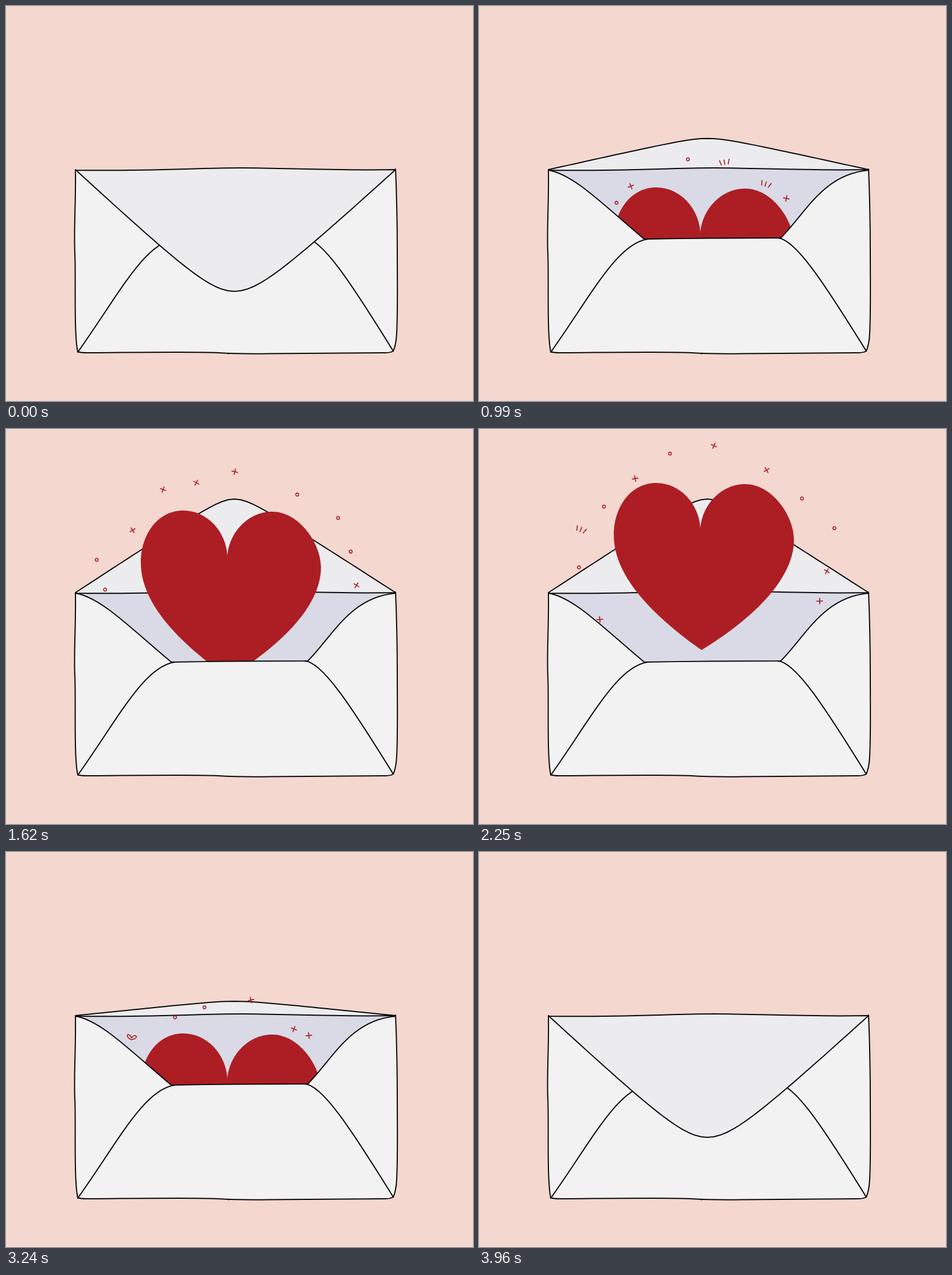
Recreate the animation shown at these times as an HTML page with a canvas. Size 814 px wide and 688 px high, loop 4140 ms.

```html
<!DOCTYPE html>
<html lang="en">
<head>
<meta charset="utf-8">
<title>Love letter</title>
<style>
  html, body { margin: 0; width: 100%; height: 100%; overflow: hidden; background: #f4d7cf; }
  canvas { display: block; }
</style>
</head>
<body>
<canvas id="stage" width="814" height="688"></canvas>
<script>
const ctx = document.getElementById('stage').getContext('2d');
const STEP = 90, STEPS = 46;
const PINK = '#f4d7cf', PAPER = '#f2f2f2', FLAP = '#ececee', LINING = '#d9dae6', RED = '#ac1e24', INK = '#080808';

// The mouth runs left to right, the top edge back again.
const mouthEdge = 'M121,286 C165,293 215,345 288,406 Q400,404 526,404 C570,360 600,293 679,286';
const topEdge = 'C560,287 490,282 410,282 S250,288 121,286';
const mouth = new Path2D(mouthEdge + topEdge);
const front = new Path2D(mouthEdge +
  'L679,284 C681,330 682,380 682,430 S683,530 681,570 Q680,590 675,601 Q670,604 660,604' +
  'L460,605.5 C420,606 400,606 370,604 S260,603 140,604 Q130,604 125,602' +
  'C118,570 122,470 120,430 S122,340 121,286Z');
const creases = new Path2D('M125,603 C195,505 240,414 294,406 M520,404 C550,404 600,480 675,601');
const heart = new Path2D('M386,174 C388,135 420,96 464,96 C510,96 549,150 549,193 C549,265 470,335 388,385' +
  'C310,330 235,260 235,185 C235,135 265,94 309,94 C350,94 384,130 386,174Z');

const marks = {
  x: new Path2D('M-5,0H5M0,-5V5'),
  o: new Path2D('M2.6,0A2.6,2.6 0 1 1 2.6,-.1Z'),
  l: new Path2D('M-6,4L-8,-4M0,4V-4M6,4L9,-4'),
  h: new Path2D('M0,4C-10,1 -9,-5 -6,-4Q-2,-3 0,1C1,-3 5,-6 8,-3Q9,1 0,4')
};

function paint(path, color, outlined) {
  ctx.fillStyle = color;
  ctx.fill(path);
  if (outlined) outline(path, INK, 2);
}

function outline(path, color, width) {
  ctx.strokeStyle = color;
  ctx.lineWidth = width;
  ctx.stroke(path);
}

function at(x, y, angle, paintHere) {
  ctx.save();
  ctx.translate(x, y);
  ctx.rotate(angle);
  paintHere();
  ctx.restore();
}

function seeded(seed) {
  return () => {
    seed = (seed * 16807) % 2147483647;
    return seed / 2147483647;
  };
}

function tipHeight(step) {
  const p = Math.min(Math.max((step - 2) / 12, 0), 1);
  return 497 - 375 * p - 15 * Math.sin(2 * Math.PI * p);
}

// Both sides of the flap are a hyperbola with its rounded vertex at the tip.
function flapPath(tip) {
  const base = 285, round = 0.15 + (tip - base) / 4000;
  const bend = u => Math.hypot(u, round) - round;
  let path = 'M121,286';
  for (let u = -1; u <= 1.001; u += 0.04) {
    const x = 398 + u * (u < 0 ? 277 : 281);
    path += `L${x},${base + (tip - base) * (1 - bend(u) / bend(1))}`;
  }
  return new Path2D(path + topEdge);
}

// A ring of marks follows the heart, redrawn by hand at every step.
function drawConfetti(step, drop, ceiling) {
  const random = seeded(step * 7919 + 17), count = 18;
  for (let i = 0; i < count; i++) {
    const angle = (i + random() * 0.7) / count * 2 * Math.PI;
    const reach = 1.08 + 0.24 * random();
    const x = 392 + 185 * reach * Math.sin(angle);
    const y = 240 + drop - 165 * reach * Math.cos(angle);
    const kind = 'xxxxoooolh'[Math.floor(random() * 10)];
    const tilt = random() * 1.2 - 0.6;
    if (y > ceiling && y < 390) at(x, y, tilt, () => outline(marks[kind], RED, 1.7));
  }
}

function draw(step) {
  const tip = tipHeight(step), open = tip < 284, flap = flapPath(tip);
  const rest = Math.min(Math.max(21 - step, 0), 7);
  const drop = 4.2 * rest + 3.93 * rest * rest;

  ctx.fillStyle = PINK;
  ctx.fillRect(0, 0, 814, 688);
  paint(mouth, LINING);
  if (open) paint(flap, FLAP, true);
  at(0, drop, 0, () => paint(heart, RED));
  drawConfetti(step, drop, open ? 0 : 290);
  paint(front, PAPER, true);
  outline(creases, INK, 2);
  if (!open) paint(flap, FLAP, true);
}

function tick() {
  const step = Math.floor(performance.now() / STEP) % STEPS;
  draw(Math.min(step, STEPS - step));   // plays out, then back
  requestAnimationFrame(tick);
}

ctx.lineCap = ctx.lineJoin = 'round';
tick();
</script>
</body>
</html>
```
